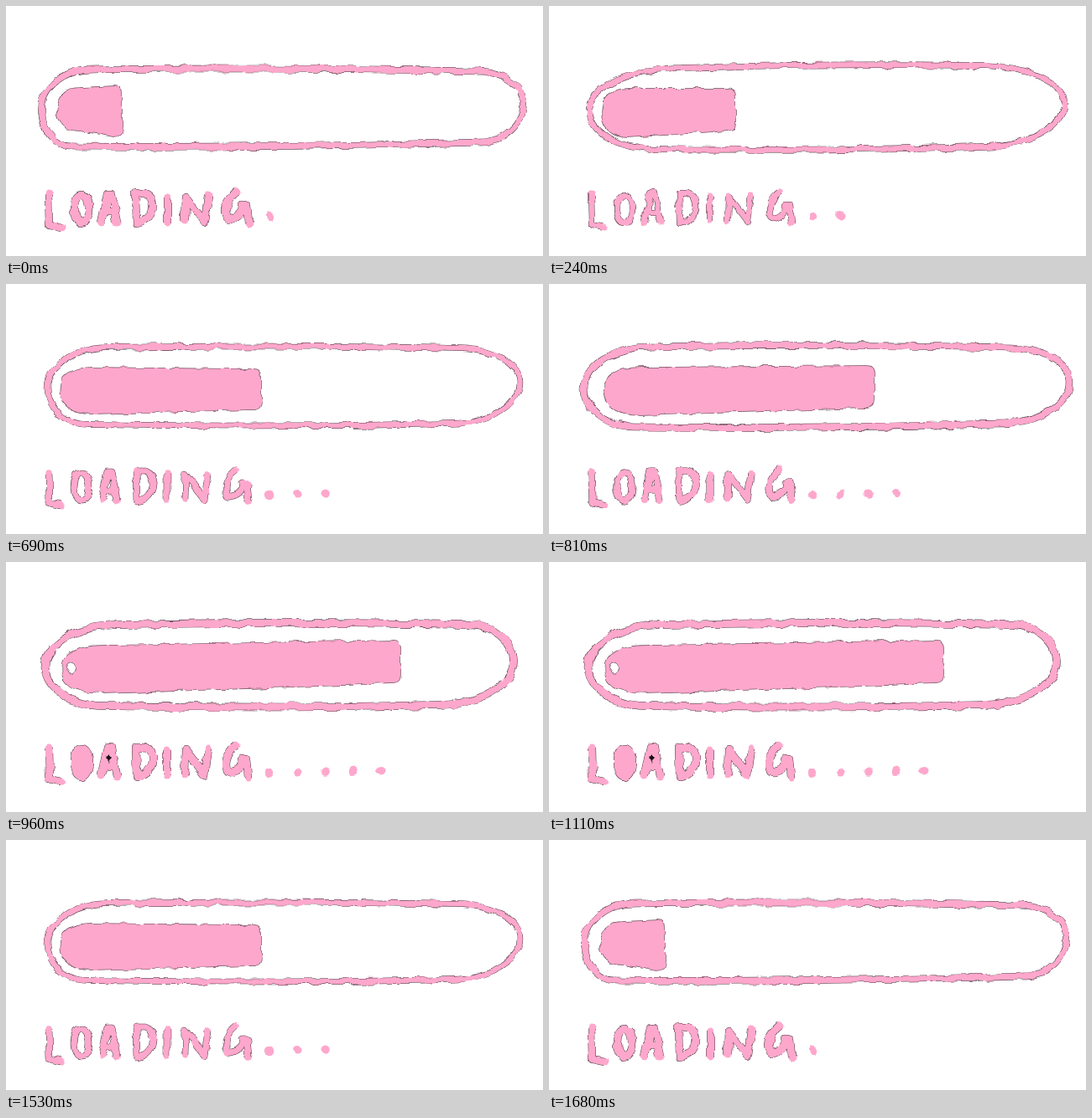
An HTML page for the animation above (1710 ms loop, 640 by 299 pixels).

```html
<!DOCTYPE html>
<html lang="en">
<head>
<meta charset="utf-8">
<title>Loading</title>
<style>
  html, body { margin: 0; width: 100%; height: 100%; overflow: hidden; background: #fff; }
  svg { display: block; width: 100%; height: 100%; }
  path { fill: none; stroke-linejoin: round; }
  .ink { stroke: #fea7cc; stroke-linecap: round; }
  .rim { stroke: #49373f; stroke-dasharray: 64 3 31 2 97 4; }
</style>
</head>
<body>
<svg id="stage" viewBox="0 0 640 299" role="img" aria-label="Loading"></svg>
<script>
const LOOP = 1710, STEP = 30;
const PINK = '#fea7cc';
const stage = document.getElementById('stage');

const letters = {
  L: 'M51 225L52 262L66 265',
  O: 'M90 226C102 226 102 259 90 259C78 259 78 226 90 226Z',
  A: 'M114 258L121 224H126L132 259M116 246H130',
  D: 'M155 224L156 260C178 256 181 229 165 224Z',
  I: 'M192 228V258',
  N: 'M213 257L214 228L237 258L241 227',
  G: 'M275 222C257 236 261 256 268 254C278 252 284 244 281 238H287L289 260'
};

// sides: [left, right]; top, bottom: [at left, at right];
// caps: lengths of the rounded ends, clockwise from the top left
const drawings = [
  {
    ring: { sides: [42.5, 616.5], top: [76, 78], bottom: [168, 163], caps: [60, 55, 50, 35], line: 7.5 },
    bar: { top: [98, 96], bottom: [149, 156] }, ink: 9
  },
  {
    ring: { sides: [48, 615], top: [74, 71], bottom: [171, 168], caps: [110, 105, 100, 75], line: 6.5 },
    bar: { top: [99, 99], bottom: [157, 149] }, ink: 7
  },
  {
    ring: { sides: [49.5, 612.5], top: [76, 77], bottom: [168, 167], caps: [72, 75, 85, 48], line: 6.5 },
    bar: { top: [100, 102], bottom: [155, 150] }, ink: 7.5
  },
  {
    ring: { sides: [42, 620], top: [75, 76], bottom: [171, 167], caps: [80, 70, 85, 60], line: 7.5 },
    bar: { top: [100, 98], bottom: [157, 148] }, ink: 8
  },
  {
    ring: { sides: [46.5, 605], top: [75, 75], bottom: [172, 171], caps: [90, 55, 90, 68], line: 8.5 },
    bar: { top: [100, 94], bottom: [157, 145] }, ink: 9, lift: 3, full: 'O'
  }
];

// [start, drawing]: slow filling, a hold, then a quick run back
const timeline = [
  ...[0, 1, 2, 3, 4].map(i => [i * 240, i]),
  ...[3, 2, 1, 0].map((i, n) => [1440 + n * 60, i])
];
const HOLE_CLOSES = 1200;

function add(parent, tag, attrs) {
  const node = document.createElementNS('http://www.w3.org/2000/svg', tag);
  for (const key in attrs) node.setAttribute(key, attrs[key]);
  return parent.appendChild(node);
}

// Long capsule with four elliptical corners and slightly bowed long sides
function capsule({ sides: [l, r], top, bottom, caps: [a, b, c, d] }, bow = 0) {
  const K = .45;
  const x = (l + r) / 2;
  const leftY = (top[0] + bottom[0]) / 2 + bow / 4;
  const rightY = (top[1] + bottom[1]) / 2 - bow;
  const mix = (from, to) => from + (to - from) * (1 - K);
  return `M${l} ${leftY}
    C${l} ${mix(leftY, top[0])} ${l + a * K} ${top[0]} ${l + a} ${top[0]}
    Q${x} ${(top[0] + top[1]) / 2 - bow} ${r - b} ${top[1]}
    C${r - b * K} ${top[1]} ${r} ${mix(rightY, top[1])} ${r} ${rightY}
    C${r} ${mix(rightY, bottom[1])} ${r - c * K} ${bottom[1]} ${r - c} ${bottom[1]}
    Q${x} ${(bottom[0] + bottom[1]) / 2 + bow} ${l + d} ${bottom[0]}
    C${l + d * K} ${bottom[0]} ${l} ${mix(leftY, bottom[0])} ${l} ${leftY}Z`;
}

// Bar with a round left end; its right end is nearly square
function barPath({ top, bottom }, i) {
  const end = 26 + 6 * i;
  const sides = [61.5 + 1.4 * i, 138 + 83 * i];
  const [l, r] = sides;
  const middle = (top[0] + bottom[0]) / 2;
  return `M${l} ${middle}Q${l} ${top[0]} ${l + end} ${top[0]}
    L${r - 8} ${top[1]}Q${r} ${top[1]} ${r} ${top[1] + 9}
    V${bottom[1] - 9}Q${r} ${bottom[1]} ${r - 8} ${bottom[1]}
    L${l + end} ${bottom[0]}Q${l} ${bottom[0]} ${l} ${middle}Z`;
}

// Seeded noise roughens every contour like a shaky pen
function addRoughness(i) {
  const filter = add(stage, 'filter', {
    id: `rough${i}`, filterUnits: 'userSpaceOnUse', x: 0, y: 0, width: 640, height: 299,
    'color-interpolation-filters': 'sRGB'
  });
  add(filter, 'feTurbulence', { type: 'fractalNoise', baseFrequency: .06, numOctaves: 2, seed: i + 1, result: 'noise' });
  add(filter, 'feDisplacementMap', { in: 'SourceGraphic', in2: 'noise', scale: 7, xChannelSelector: 'R', yChannelSelector: 'G' });
}

function pen(parent, d, width, fill = 'none') {
  add(parent, 'path', { d, class: 'rim', 'stroke-width': width + 1 });
  add(parent, 'path', { d, class: 'ink', 'stroke-width': width, style: `fill:${fill}` });
}

function build({ ring, bar, ink, lift = 0, full = '' }, i) {
  addRoughness(i);
  const group = add(stage, 'g', { filter: `url(#rough${i})`, display: 'none' });
  pen(group, capsule(ring, 4), ring.line);
  pen(group, barPath(bar, i), .4, PINK);

  const word = add(group, 'g', { transform: `translate(0 ${-lift})` });
  for (const [name, d] of Object.entries(letters)) {
    pen(word, d, ink, full.includes(name) ? PINK : 'none');
  }
  for (let k = 0; k <= i; k++) {
    add(group, 'circle', { cx: 314 + 33.3 * k, cy: 252 - .7 * k, r: 5.2, fill: PINK });
  }
  return group;
}

const groups = drawings.map(build);
const last = groups[groups.length - 1];
add(last, 'path', { d: 'M123 229l4 4-4 4-4-4z', style: 'fill:#171114' });
const hole = add(last, 'ellipse', { cx: 77, cy: 127.5, rx: 5.5, ry: 6.5, fill: '#fff', stroke: '#604b55', 'stroke-width': .8 });
const slit = add(last, 'path', { d: 'M78 123.5v6', stroke: '#2b2025', 'stroke-width': 1.6 });
const rims = [...stage.querySelectorAll('.rim')];

const show = (node, on) => node.setAttribute('display', on ? 'inline' : 'none');

function render(time) {
  const t = time % LOOP;
  const current = timeline.filter(([start]) => start <= t).pop()[1];
  groups.forEach((group, i) => show(group, i === current));
  show(hole, t < HOLE_CLOSES);
  show(slit, t >= HOLE_CLOSES);
  // The breaks in the outline wander on every step
  const shift = Math.floor(t / STEP) * 37 % 201;
  rims.forEach((rim, i) => rim.setAttribute('stroke-dashoffset', shift + i * 11));
}

let origin;
function tick(now) {
  origin ??= now;
  render(now - origin);
  requestAnimationFrame(tick);
}
render(0);
requestAnimationFrame(tick);
</script>
</body>
</html>
```
